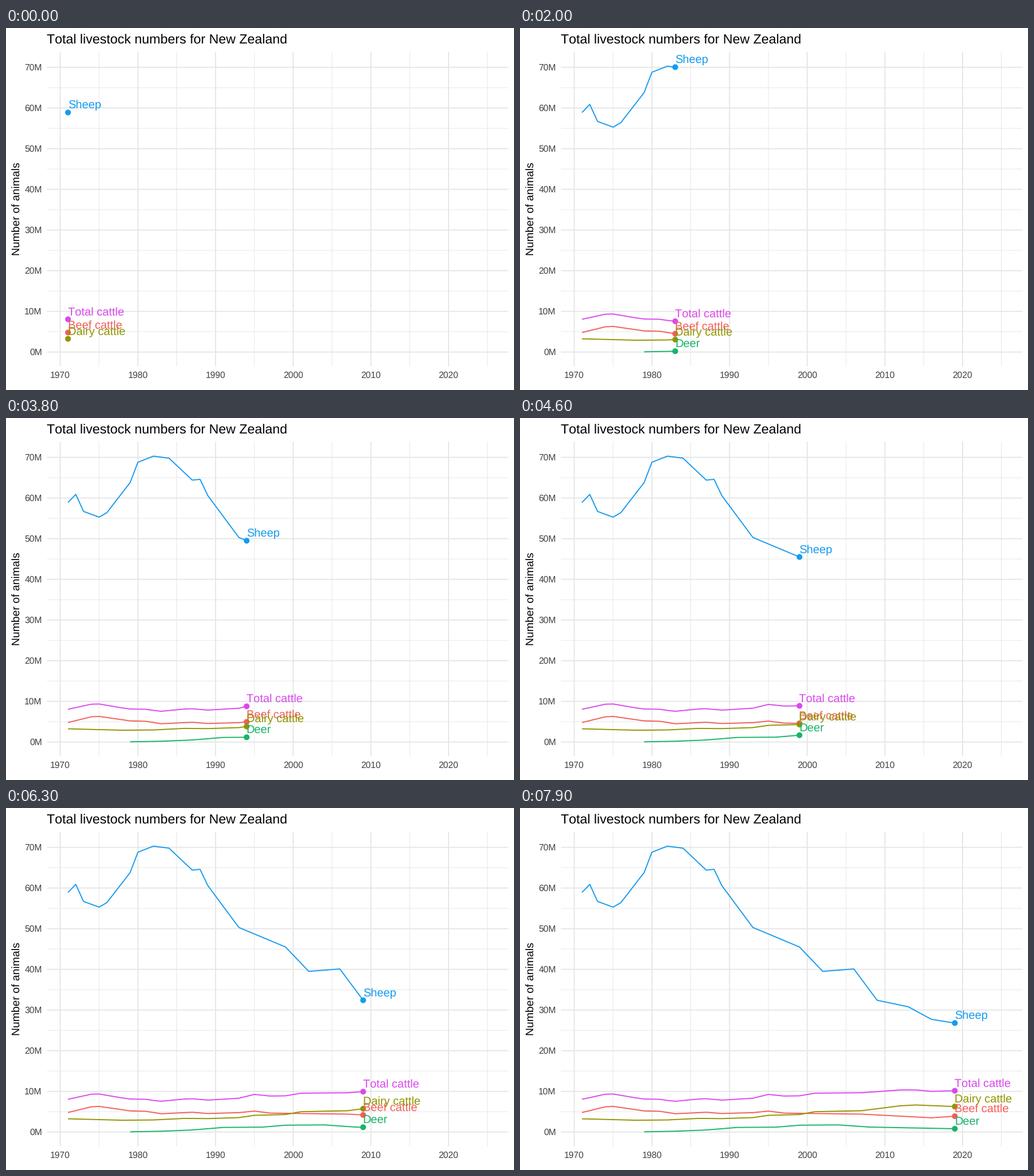
A matplotlib script that plays this animation: 885 by 632 pixels, repeating every 10 s.

```python
import matplotlib.pyplot as plt
import numpy as np
from matplotlib.animation import FuncAnimation
from matplotlib.patches import Circle

WIDTH, HEIGHT, DPI = 885, 632, 64
PT = 72 / DPI  # points per pixel
FRAMES, MOVING, INTERVAL = 100, 80, 100
LEFT, RIGHT, TOP, BOTTOM = 71.5, 875.2, 41.5, 590.6
FIRST, LAST = 1971, 2019
GRID, TICK_TEXT = "#E6E6E6", "#404040"

plt.rcParams.update({
    "font.family": "Liberation Sans",
    "text.hinting": "none",
    "text.kerning_factor": 16,  # effectively no kerning
    "path.simplify": False,
})

all_years = np.arange(FIRST, LAST + 1)


def trend(*turns):
    """Yearly values on straight runs between (year, millions) turning points."""
    years, millions = zip(*turns)
    return np.interp(all_years, years, millions, left=np.nan)


sheep = trend((1971, 58.9), (1972, 60.9), (1973, 56.7), (1975, 55.3), (1976, 56.4),
              (1979, 63.8), (1980, 68.8), (1982, 70.3), (1984, 69.8), (1987, 64.4),
              (1988, 64.6), (1989, 60.6), (1993, 50.3), (1999, 45.5), (2002, 39.5),
              (2006, 40.1), (2009, 32.4), (2013, 30.8), (2016, 27.7), (2019, 26.8))
dairy = trend((1971, 3.25), (1978, 2.9), (1982, 2.97), (1986, 3.35), (1989, 3.3),
              (1993, 3.55), (1995, 4.1), (1999, 4.3), (2001, 5.0), (2007, 5.25),
              (2012, 6.45), (2014, 6.65), (2019, 6.26))
beef = trend((1971, 4.8), (1974, 6.2), (1975, 6.3), (1979, 5.2), (1981, 5.1),
             (1983, 4.5), (1987, 4.85), (1989, 4.55), (1993, 4.76), (1995, 5.15),
             (1997, 4.65), (2007, 4.4), (2016, 3.5), (2019, 3.89))
deer = trend((1979, 0.05), (1983, 0.2), (1987, 0.5), (1991, 1.13), (1996, 1.2),
             (1999, 1.68), (2004, 1.75), (2008, 1.22), (2013, 1.03), (2019, 0.81))


def x_px(year):
    return LEFT + (year - 1968.3) * (RIGHT - LEFT) / 59.4


def y_px(millions):
    return 565.7 - 7.1 * millions


fig = plt.figure(figsize=(WIDTH / DPI, HEIGHT / DPI), dpi=DPI, facecolor="white")
ax = fig.add_axes([0, 0, 1, 1])
ax.set(xlim=(0, WIDTH), ylim=(HEIGHT, 0))
ax.axis("off")


def write(x, y, text, size, color="black", **kwargs):
    kwargs = {"ha": "left", "va": "baseline", **kwargs}
    return ax.text(x, y, text, fontsize=size * PT, color=color, **kwargs)


def stroke(xs, ys, width, color, **kwargs):
    return ax.plot(xs, ys, color=color, lw=width * PT, snap=False,
                   solid_capstyle="butt", **kwargs)[0]


def draw_grid():
    for years, levels, width in ((range(1975, 2026, 10), range(5, 70, 10), 0.95),
                                 (range(1970, 2021, 10), range(0, 71, 10), 1.9)):
        for level in levels:
            stroke([LEFT, RIGHT], [y_px(level)] * 2, width, GRID, zorder=1)
        for year in years:
            stroke([x_px(year)] * 2, [TOP, BOTTOM], width, GRID, zorder=1)


def draw_labels():
    write(71, 26.8, "Total livestock numbers for New Zealand", 23.15)
    write(23.8, 315.6, "Number of animals", 19.35, ha="center",
          rotation=90, rotation_mode="anchor")
    for year in range(1970, 2021, 10):
        write(x_px(year), 610.5, str(year), 15.64, TICK_TEXT, ha="center")
    for level in range(0, 71, 10):
        write(62.7, y_px(level) + 5.6, f"{level}M", 15.64, TICK_TEXT, ha="right")


class Series:
    def __init__(self, name, color, values):
        known = ~np.isnan(values)
        self.years, self.values = all_years[known], values[known]
        self.line = stroke([], [], 1.9, color, zorder=2, solid_joinstyle="round")
        self.dot = ax.add_patch(Circle((0, 0), 5.05, fc=color, lw=0,
                                       snap=False, zorder=3))
        self.label = write(0, 0, name, 20.05, color, zorder=4)

    def reveal(self, year):
        visible = year >= self.years[0]
        for artist in (self.line, self.dot, self.label):
            artist.set_visible(visible)
        past = self.years < year
        x = x_px(year)
        y = y_px(np.interp(year, self.years, self.values))
        self.line.set_data(np.append(x_px(self.years[past]), x),
                           np.append(y_px(self.values[past]), y))
        self.dot.center = x, y
        self.label.set_position((x - 0.4, y - 7.2))


draw_grid()
draw_labels()
series = [
    Series("Beef cattle", "#F35E5A", beef),
    Series("Dairy cattle", "#929400", dairy),
    Series("Deer", "#17B469", deer),
    Series("Sheep", "#169BF0", sheep),
    Series("Total cattle", "#DB48EE", beef + dairy),
]

# Every year lands on a whole frame, with even steps in between.
year_frames = np.round((MOVING - 1) * (all_years - FIRST) / (LAST - FIRST))


def update(frame):
    year = np.interp(frame, year_frames, all_years)
    for item in series:
        item.reveal(year)
    return []


anim = FuncAnimation(fig, update, frames=FRAMES, interval=INTERVAL,
                     init_func=lambda: update(0), repeat=True, repeat_delay=0)
plt.show()
```
